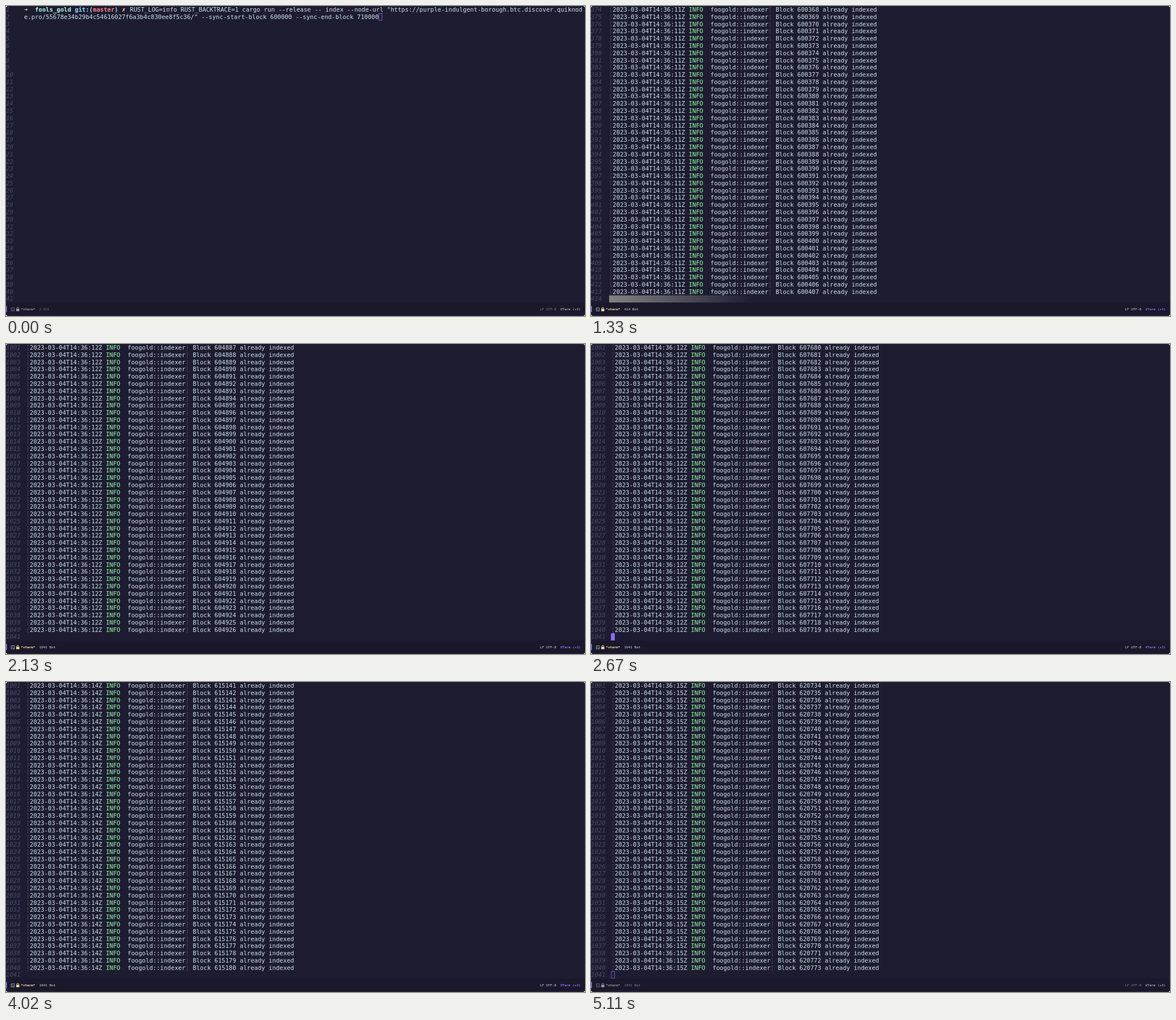
These frames come from a looping animation (1023 by 548 pixels, 5380 ms). An HTML page:

```html
<!DOCTYPE html>
<html lang="en">
<head>
<meta charset="utf-8">
<title>Block indexer in a terminal</title>
<style>
html, body { margin: 0; width: 100%; height: 100%; overflow: hidden; background: #fff; }
#stage {
  --bg: #1e1c31; --fg: #cbe3e7; --violet: #906cff; --yellow: #ffe9aa;
  position: absolute; left: 0; top: 0; width: 2560px; height: 1371.4px;
  transform: scale(.39961); transform-origin: 0 0;
  overflow: hidden; border-radius: 10px; background: var(--bg); color: var(--fg);
  font: 26.58px/32px "DejaVu Sans Mono", monospace; font-kerning: none;
}
#stage > *, #bar > * { position: absolute; margin: 0; font-family: inherit; }
#gutter { left: 0; top: 0; color: #4c4b68; font-style: italic; }
#out { top: 0; }
#cursor { width: 16px; height: 32px; box-sizing: border-box; border: 2px solid var(--violet); }
#beacon { left: 80px; top: 1280px; width: 640px; height: 32px; background: linear-gradient(90deg, #828282, var(--bg)); }
.dim { color: #454451; }
.info, .arrow { color: #95ffa4; }
.dir { color: #aaffe4; }
.git { color: #91ddff; }
.branch { color: #ff8080; }
.dirty { color: var(--yellow); margin-right: 4px; }
#bar { left: 0; top: 1312px; width: 100%; height: 60px; background: #1a182a; font-size: 14.95px; line-height: 58px; --name: var(--yellow); --mode: var(--violet); }
#bar.idle { color: #858594; --name: #a0a0ad; --mode: #a0a0ad; }
#mark { left: 0; top: 15px; width: 4px; height: 27px; background: var(--violet); }
#icons { left: 20px; top: 18px; }
#name { left: 66px; color: var(--name); }
#pos { left: 147px; }
#mode { right: 19px; }
#mode b { color: var(--mode); }
</style>
</head>
<body>
<div id="stage">
  <pre id="gutter"></pre>
  <pre id="out"></pre>
  <div id="beacon"></div>
  <div id="cursor"></div>
  <div id="bar">
    <div id="mark"></div>
    <svg id="icons" width="42" height="24" fill="none" stroke="currentColor" stroke-width="1.6">
      <path d="M3 5H17V19H3ZM6 9l3 3-3 3M10 15h4"/>
      <g style="stroke:var(--name)">
        <path d="M28 11V7a4 4 0 0 1 8 0v4" stroke-width="2.4"/>
        <rect x="26" y="11" width="12" height="8" style="fill:var(--name)"/>
      </g>
    </svg>
    <b id="name">*vterm*</b>
    <pre id="pos"></pre>
    <pre id="mode">LF UTF-8  <b>VTerm (+3)</b></pre>
  </div>
</div>
<script>
const LOOP = 5380, ROWS = 41, CHAR = 16, LINE = 32;
const OFF = 0, ON = 1, HOLLOW = 2;
// start ms, first block (0 = prompt), clock second, cursor, cursor row, window idle
const steps = [
  [0, 0, 0, HOLLOW, 2, 1],
  [250, 0, 0, ON, 2],
  [510, 0, 0, OFF, 2],
  [780, 0, 0, ON, 2],
  [1060, 0, 0, ON, 3],
  [1330, 600368, 11, OFF, 41],
  [1600, 602146, 11, ON, 41],
  [1860, 603493, 12, ON, 41],
  [2130, 604887, 12, OFF, 41],
  [2400, 606284, 12, OFF, 41],
  [2670, 607680, 12, ON, 41],
  [2940, 609330, 13, OFF, 41],
  [3210, 610974, 13, OFF, 41],
  [3480, 612363, 13, ON, 41],
  [3750, 613752, 13, ON, 41],
  [4020, 615141, 14, OFF, 41],
  [4300, 616578, 14, OFF, 41],
  [4570, 617963, 14, HOLLOW, 41, 1],
  [4840, 619349, 15, HOLLOW, 41, 1],
  [5110, 620734, 15, HOLLOW, 41, 1]
];

const $ = id => document.getElementById(id);
const span = (cls, text) => `<span class="${cls}">${text}</span>`;
const lines = (n, make) => Array.from({ length: n }, (_, i) => make(i)).join("\n");

const prompt = span("arrow", "➜") + "  <b>" + span("dir", "fools_gold") + " " +
  span("git", "git:(") + span("branch", "master") + span("git", ")") + " " + span("dirty", "✗") + "</b> " +
  'RUST_LOG=info RUST_BACKTRACE=1 cargo run --release -- index --node-url "https://purple-indulgent-borough.btc.discover.quiknod\n' +
  'e.pro/55678e34b29b4c54616027f6a3b4c830ee8f5c36/" --sync-start-block 600000 --sync-end-block 710000';

const stamp = sec => span("dim", "[") + `2023-03-04T14:36:${sec}Z`;
const logLine = (block, sec) =>
  `${stamp(sec)} ${span("info", "INFO")}  foogold::indexer${span("dim", "]")} Block ${block} already indexed`;

function render([start, block, sec, cursor, row, idle]) {
  const flash = start === 1330, partial = start === 1600;
  const first = !block ? 1 : flash ? 374 : 1001;
  const left = first > 1000 ? 89.4 : 80;
  const col = partial ? 19 : !block && row === 2 ? 98 : 0;

  $("gutter").textContent = lines(ROWS, i => first + i);
  $("out").style.left = left + "px";
  $("out").innerHTML = block
    ? lines(ROWS - 1, i => logLine(block + i, sec)) + (partial ? "\n" + span("dim", "[") + "2023-03-04T14:36:1" : "")
    : prompt;
  $("beacon").hidden = !flash;

  const c = $("cursor").style;
  c.display = cursor ? "block" : "none";
  c.background = cursor === ON ? "var(--violet)" : "none";
  c.left = left + col * CHAR + "px";
  c.top = (row - 1) * LINE + "px";

  $("bar").className = idle ? "idle" : "";
  $("pos").textContent = first + row - 1 + (block ? " Bot" : " All");
}

let shown;
const begin = performance.now();
function tick() {
  const t = (performance.now() - begin) % LOOP;
  const step = steps.findLast(s => s[0] <= t);
  if (step !== shown) render(shown = step);
  requestAnimationFrame(tick);
}
tick();
</script>
</body>
</html>
```
